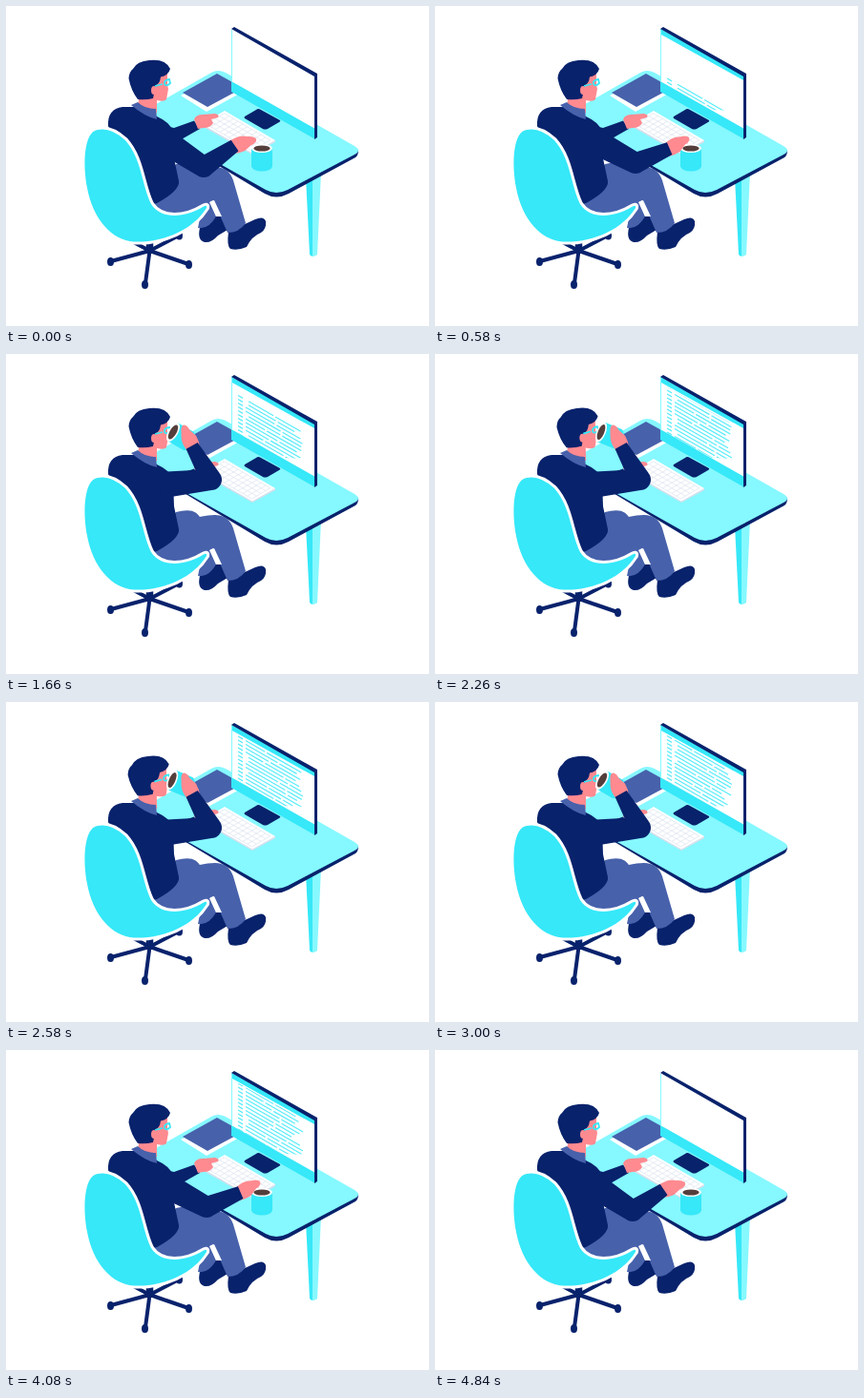
An HTML page for the animation above (5420 ms loop, 443 px wide and 336 px high).

```html
<!DOCTYPE html>
<html lang="en">
<head>
<meta charset="utf-8">
<title>Desk work</title>
<style>
  html, body { margin: 0; width: 100%; height: 100%; overflow: hidden; background: #fff; }
  svg { display: block; width: 100%; height: 100%; }
  .navy { fill: #08226c; }
  .cyan { fill: #36e8f8; }
  .pale { fill: #86f8ff; }
  .blue { fill: #4761ab; }
  .skin { fill: #ff8a90; }
  .white { fill: #fff; }
  .coffee { fill: #543f3d; }
  .line { fill: none; stroke: #08226c; }
  .keys { fill: none; stroke: #dbe3ee; stroke-width: .7; }
  .shell { stroke: #fff; stroke-width: 6; paint-order: stroke; }
  #rows { fill: none; stroke: #5aecfa; stroke-width: 1.2; }
</style>
</head>
<body>
<svg viewBox="0 0 443 336">
  <defs>
    <clipPath id="page"><path d="M242 34L312 74V110L290 109L242 83Z"/></clipPath>
    <path id="palm" d="M-4-6C2-8 8-9 13-7L21-4Q26-1 23 2Q21 4 17 4L9 8Q2 9-4 7Z"/>
  </defs>

  <!-- desk -->
  <path class="cyan" d="M314 180L322 176V263Q319 263 318 261Z"/>
  <path class="pale" d="M321 176L330 174L326 261Q324 263 321 263Z"/>
  <path class="navy" d="M160 130L271 197Q283 204 296 197L366 159Q369 157 369 151L300 140Z"/>
  <path class="pale" d="M152 106L215 70Q222 66 230 70L365 147Q373 152 365 156L295 193Q283 199 272 193L152 125Z"/>
  <path class="white" d="M183 94L221 74L248 90L210 111Z"/>
  <path class="blue" d="M185 91L221 71L248 86L211 106Z"/>

  <!-- monitor -->
  <path class="navy" d="M250 116L262 109Q264 107 267 109L287 120Q288 121 286 122L274 129Q271 130 269 129L250 118Q249 117 250 116Z"/>
  <path class="cyan" d="M236 78L324 128V140L236 90Z"/>
  <path class="white" d="M236 25L324 74V129L236 79Z"/>
  <path class="cyan" id="bar" d="M236 24L324 73V78.500L236 29.500Z"/>
  <path class="navy" d="M236 24L239 22L326 71V138L323 140V74Z"/>
  <path d="M236.5 25V80" fill="none" stroke="#86f8ff"/>
  <g clip-path="url(#page)"><path id="rows"/></g>

  <!-- keyboard -->
  <path d="M205 124L282 141V143L258 156L205 126Z" fill="#d5e0ec"/>
  <path class="white" d="M205 124L229 110L282 141L258 154.500Z"/>
  <path class="keys" id="keys"/>

  <!-- chair base -->
  <g class="line" stroke-width="4" stroke-linecap="round">
    <path d="M150.500 243V259" stroke-width="7.500" stroke-linecap="butt"/>
    <path d="M150.500 257L110 268M150.500 257L146 291M150.500 257L191 271M150.500 257L181 241M150.500 257L126 244"/>
  </g>
  <g class="navy">
    <ellipse cx="109.500" cy="268.500" rx="3.500" ry="4.500"/>
    <ellipse cx="145.500" cy="292.500" rx="3.500" ry="4.500"/>
    <ellipse cx="191.500" cy="271.500" rx="3.500" ry="4.500"/>
    <ellipse cx="181.500" cy="241" rx="3.500" ry="4.500"/>
  </g>

  <!-- far arm -->
  <g id="far">
    <path class="navy" d="M150 122L176 128L197 120.500L203 129L182 141L150 150Z"/>
    <path class="skin" d="M197 119Q199 114 206 114L219 113Q224 114 222 117L215 119L217 123Q214 128 207 128L201 129Z"/>
  </g>

  <!-- legs -->
  <path class="navy" d="M203 233Q200 246 208 248Q215 249 222 241L232 235V222L220 220Z"/>
  <path class="blue" d="M160 186L178 166Q200 160 204 174L210 196L220 221Q212 235 201 233L206 208L160 212Z"/>
  <path class="navy" d="M233 237Q231 252 235 255Q243 257 252 253Q257 242 267 238Q273 234 272 226Q270 220 261 224L248 230Z"/>
  <path class="blue" d="M152 207L184 177Q204 169 219 169Q233 169 238 183L251 228Q244 238 232 238L217 204L180 222H156Z"/>
  <path class="white" d="M213 206L218 204L226 221L220 221Z"/>

  <!-- torso -->
  <path class="navy" d="M107 126Q106 108 122 106L137 106L158 116Q172 122 175 132L176 160L181 184Q182 194 158 207L148 210L120 160Z"/>
  <g id="head">
    <path class="skin" d="M140 92L158 96V112Q152 118 138 105Z"/>
    <path class="skin" d="M153 70L169 71L169 83L170 87L168 98Q166 101 158 99L150 97Z"/>
    <path class="navy" d="M138 98Q131 89 128.500 76Q129 69 133 66Q137 58 150 57Q167 55 172 66Q170 73 162 74.500Q161 82 157 83L154 97Q146 99 138 98Z"/>
    <ellipse class="skin" cx="155" cy="88.500" rx="3" ry="4.500"/>
    <path d="M156 84L164 82M171 77Q165 78 166 82Q168 85 172 81Z" fill="none" stroke="#36e8f8" stroke-width="1.800"/>
  </g>
  <path class="blue" d="M131 104L138 101Q145 108 157 108L158 119Q145 116 131 104Z"/>

  <!-- chair shell -->
  <path class="cyan shell" d="M96 130C82 132 80 164 85 191C91 224 111 246 134 247.500C164 249 196 235 210 212Q211 208 206 211C188 222 163 225 152 208C142 187 142 160 125 141Q110 127 96 130Z"/>

  <!-- cup and near arm -->
  <g id="cup">
    <path class="cyan" d="M-11 0V19Q-9 24 0 24Q9 24 11 19V0Z"/>
    <ellipse class="white" id="rim" rx="11"/>
    <ellipse class="coffee" id="brew" rx="8.500"/>
  </g>
  <use class="skin" id="hand" href="#palm"/>
  <path class="navy" id="sleeve"/>
</svg>

<script>
const $ = id => document.getElementById(id);
const LOOP = 5420, STEP = 1000 / 12, SLOPE = 0.575;

// time, elbow x y, wrist x y, hand angle
const reach = [210, 165, 245, 150, -28];
const lift = [213, 150, 243, 118, -25];
const sip = [215, 132, 195, 97, -112];
const type = [207, 169, 239, 147, -16];
const armKeys = [
  [0, ...type], [250, ...type], [583, ...reach], [700, ...reach], [1000, ...lift],
  [1300, 217, 145, 216, 103, -88], [1583, ...sip], [3083, ...sip],
  [3500, 216, 147, 215.5, 106, -90], [3750, ...lift], [4083, ...reach],
  [4170, ...reach], [4600, ...type]
];

// time, x, y, angle, rim height
const rest = [268, 149.5, 0, 4.5];
const mouth = [175, 82, -60, 5.2];
const cupKeys = [
  [0, ...rest], [700, ...rest], [1000, 245, 96.5, -17, 6.5], [1300, 206, 84, -34, 6],
  [1583, ...mouth], [1833, ...mouth], [2250, 174, 82, -68, 4.8], [2500, 174, 82, -68, 4.8],
  [2917, ...mouth], [3083, ...mouth], [3500, 204, 84.5, -37, 5.8], [3750, 245, 96.5, -17, 6.5],
  [4083, ...rest]
];
const headKeys = [[1800, 0], [2250, -2], [2500, -2], [2917, 0]];

function pose(keys, t) {
  const n = keys.findIndex(k => k[0] > t);
  if (n === 0) return keys[0].slice(1);
  if (n < 0) return keys[keys.length - 1].slice(1);
  const a = keys[n - 1], b = keys[n];
  const u = (t - a[0]) / (b[0] - a[0]), e = u * u * (3 - 2 * u);
  return a.slice(1).map((v, i) => v + (b[i + 1] - v) * e);
}

function disc(x, y, r) {
  return `M${x - r} ${y}a${r} ${r} 0 1 1 ${2 * r} 0a${r} ${r} 0 1 1 ${-2 * r} 0Z`;
}

// tapered limb between two circles, wound like disc()
function limb(x1, y1, r1, x2, y2, r2) {
  const d = Math.atan2(y2 - y1, x2 - x1);
  const s = Math.acos((r1 - r2) / Math.hypot(x2 - x1, y2 - y1));
  const at = (x, y, r, a) => `${x + r * Math.cos(a)} ${y + r * Math.sin(a)}`;
  return `M${at(x1, y1, r1, d - s)}L${at(x2, y2, r2, d - s)}L${at(x2, y2, r2, d + s)}L${at(x1, y1, r1, d + s)}Z`;
}

function buildRows() {
  let seed = 11, d = "";
  const rand = () => (seed = seed * 16807 % 2147483647) / 2147483647;
  const dash = (x, y, w) => `M${x} ${y + (x - 243) * SLOPE}l${w} ${w * SLOPE}`;
  for (let i = 0; i < 36; i++) {
    const y = i * 4, start = 251 + (rand() < 0.2 ? 3 : 0);
    const end = 311 - 12 * rand() ** 2, cut = start + 18 + rand() * 26;
    d += dash(243, y, 5) + dash(start, y, cut - start) + dash(cut + 2, y, end - cut - 2);
  }
  $("rows").setAttribute("d", d);
}

function buildKeys() {
  let d = "";
  for (let i = 0; i <= 4; i++) d += `M${209.5 + i * 4.8} ${124 - i * 2.8}l48 28`;
  for (let i = 0; i <= 10; i++) d += `M${209.5 + i * 4.8} ${124 + i * 2.8}l19.2 -11.2`;
  $("keys").setAttribute("d", d);
}

function draw(t) {
  const typing = t > 0 && t < 330 || t > 4550 && t < 4800;
  const tap = typing ? Math.sin(t / STEP * 2.1) : 0;
  const [ex, ey, wx, wy0, turn] = pose(armKeys, t);
  const wy = wy0 + tap;
  $("sleeve").setAttribute("d",
    limb(160, 138, 14, ex, ey, 11) + disc(ex, ey, 11) + limb(ex, ey, 11, wx, wy, 7));
  $("hand").setAttribute("transform", `translate(${wx} ${wy}) rotate(${turn})`);

  const [cx, cy, tilt, ry] = pose(cupKeys, t);
  $("cup").setAttribute("transform", `translate(${cx} ${cy}) rotate(${tilt})`);
  $("rim").setAttribute("ry", ry);
  $("brew").setAttribute("ry", ry * 0.68);

  $("head").setAttribute("transform", `rotate(${pose(headKeys, t)[0]} 147 106)`);
  $("far").setAttribute("transform", `translate(0 ${-tap})`);
  $("bar").setAttribute("visibility", t > 0 && t < 4800 ? "visible" : "hidden");
  $("rows").setAttribute("transform", `translate(0 ${93.5 - t * 0.03})`);
  $("rows").setAttribute("visibility", t > 4800 ? "hidden" : "visible");
}

function tick(now) {
  draw(Math.floor((now % LOOP + 7) / STEP) * STEP);
  requestAnimationFrame(tick);
}

buildRows();
buildKeys();
draw(0);
requestAnimationFrame(tick);
</script>
</body>
</html>
```
